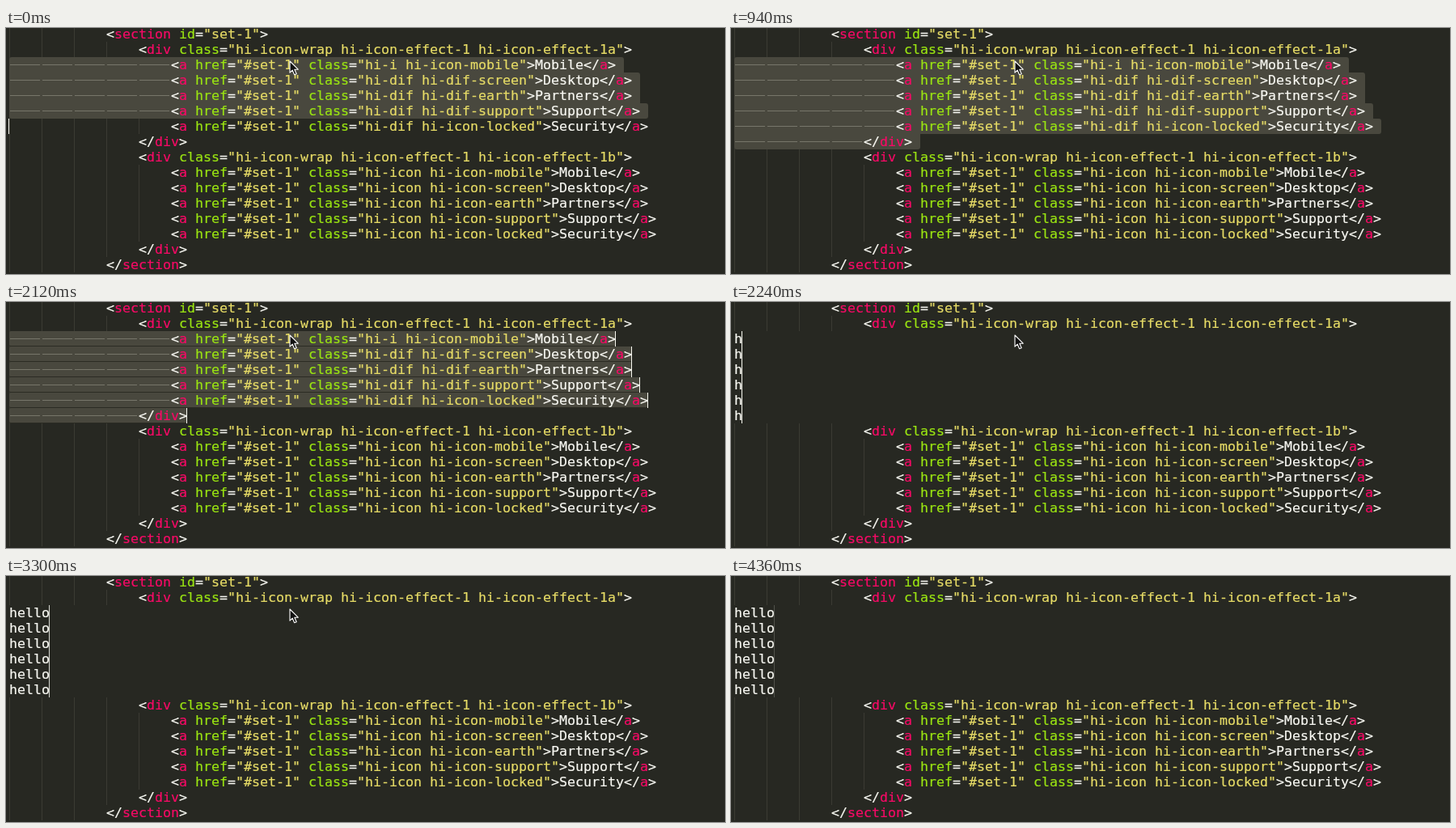
Recreate the animation shown at these times as an HTML page. Size 889x304 px, loop 4460 ms.

```html
<!DOCTYPE html>
<html lang="en">
<head>
<meta charset="utf-8">
<title>Multiple cursors</title>
<style>
  html, body { margin: 0; width: 100%; height: 100%; overflow: hidden; background: #272822; }
  #stage {
    position: relative; width: 889px; height: 304px; overflow: hidden;
    font: 16.61px/19px "DejaVu Sans Mono", Menlo, monospace;
    color: #f8f8f2; white-space: pre; -webkit-text-stroke: .2px;
  }
  #stage div, #mouse { position: absolute; }
  .row { left: 0; width: 889px; height: 19px; }
  .code { top: 0; }
  .guides {
    left: 4px; height: 19px;
    background: repeating-linear-gradient(90deg, #3b3b33 0 1px, transparent 1px 40px);
  }
  .sel { left: 4px; height: 19px; background: #49483e; box-sizing: border-box; }
  .split .sel { border: 1px solid #2b2b23; border-width: 0 0 1px; border-radius: 2px; }
  .tabs {
    left: 4px; top: 9px; height: 1px;
    background: repeating-linear-gradient(90deg, transparent 0 1px, #77766a 1px 38px, transparent 38px 40px);
  }
  .caret { width: 1px; height: 19px; background: #f8f8f0; }
  .tag { color: #f60a66; }
  .attr { color: #9ae412; }
  .str { color: #e6db66; }
  #mouse { left: 0; top: 0; }
</style>
</head>
<body>
<div id="stage">
  <svg id="mouse" width="14" height="20" viewBox="-1 -1 14 20">
    <path d="M0 0V14.2L3.2 11.2L5.6 16.8L8.2 15.7L5.8 10.2H10.2Z" fill="#111" stroke="#fff" stroke-width="1.1" stroke-linejoin="round"/>
  </svg>
</div>
<script>
const LOOP = 4460, LINE = 19, CHAR = 10, LEFT = 4, FIRST = 2, COUNT = 6;
const stage = document.getElementById('stage');
const mouse = document.getElementById('mouse');

const link = (cls, label) => [5, `<a href="#set-1" class="${cls}">${label}</a>`];
const wrap = end => [4, `<div class="hi-icon-wrap hi-icon-effect-1 hi-icon-effect-1${end}">`];
const lines = [
  [3, '<section id="set-1">'],
  wrap('a'),
  link('hi-i hi-icon-mobile', 'Mobile'),
  link('hi-dif hi-dif-screen', 'Desktop'),
  link('hi-dif hi-dif-earth', 'Partners'),
  link('hi-dif hi-dif-support', 'Support'),
  link('hi-dif hi-icon-locked', 'Security'),
  [4, '</div>'],
  wrap('b'),
  link('hi-icon hi-icon-mobile', 'Mobile'),
  link('hi-icon hi-icon-screen', 'Desktop'),
  link('hi-icon hi-icon-earth', 'Partners'),
  link('hi-icon hi-icon-support', 'Support'),
  link('hi-icon hi-icon-locked', 'Security'),
  [4, '</div>'],
  [3, '</section>']
];

// start time, mode, selected rows or typed letters, caret opacity
const beats = [
  [0, 'block', 4, 1], [240, 'block', 5, 1], [360, 'block', 6, 1],
  [710, 'block', 6, .7], [820, 'block', 6, .3], [940, 'block', 6, 0],
  [1060, 'split', 6, 1], [1300, 'split', 6, .85], [1420, 'split', 6, .5],
  [1530, 'split', 6, .2], [1650, 'split', 6, 0], [2010, 'split', 6, .5], [2120, 'split', 6, 1],
  [2240, 'type', 1, 1], [2360, 'type', 2, 1], [2600, 'type', 3, 1],
  [2840, 'type', 4, 1], [2950, 'type', 5, 1],
  [3300, 'type', 5, .85], [3420, 'type', 5, .5], [3540, 'type', 5, .2], [3660, 'type', 5, 0],
  [3780, 'type', 5, .3], [3890, 'type', 5, .7], [4010, 'type', 5, 1], [4360, 'type', 5, .2]
];

const paint = text => text.replace(
  /(<\/?)(\w+)|([\w-]+)(?==")|("[^"]*")|>/g,
  (all, open, tag, attr, str) =>
    tag ? `${open.replace('<', '&lt;')}<span class="tag">${tag}</span>` :
    attr ? `<span class="attr">${attr}</span>` :
    str ? `<span class="str">${str}</span>` : '&gt;');

function add(parent, cls) {
  const el = document.createElement('div');
  el.className = cls;
  parent.insertBefore(el, parent === stage ? mouse : null);
  return el;
}

const rows = lines.map(([indent, text], i) => {
  const row = add(stage, 'row');
  row.style.top = i * LINE - 2 + 'px';
  const part = {
    row, html: paint(text), indent,
    end: LEFT + indent * 40 + text.length * CHAR,
    guides: add(row, 'guides'), sel: add(row, 'sel'),
    tabs: add(row, 'tabs'), code: add(row, 'code'), caret: add(row, 'caret')
  };
  part.guides.style.width = part.tabs.style.width = indent * 40 + 'px';
  return part;
});

const show = (el, on) => { el.style.display = on ? '' : 'none'; };

function draw([, mode, amount, glow]) {
  stage.className = mode;
  rows.forEach((r, i) => {
    const n = i - FIRST;
    const active = n >= 0 && n < COUNT;
    const typed = active && mode === 'type';
    const picked = active && mode !== 'type' && n < amount;
    const html = typed ? 'hello'.slice(0, amount) : r.html;
    if (r.code.innerHTML !== html) r.code.innerHTML = html;
    r.code.style.left = LEFT + (typed ? 0 : r.indent * 40) + 'px';
    show(r.guides, !typed);
    show(r.sel, picked);
    show(r.tabs, picked);
    r.sel.style.width = r.end - LEFT + (mode === 'block' ? CHAR : 0) + 'px';
    if (picked && mode === 'block') {
      const above = n ? rows[i - 1].end : 0;
      const below = n < amount - 1 ? rows[i + 1].end : 0;
      const round = on => on ? '3px ' : '0 ';
      r.sel.style.borderRadius = round(!n) + round(r.end > above) + round(r.end > below) + round(!below);
    } else {
      r.sel.style.borderRadius = '';
    }
    show(r.caret, mode === 'block' ? n === amount : active);
    r.caret.style.opacity = glow;
    r.caret.style.left = (mode === 'block' ? LEFT : typed ? LEFT + amount * CHAR : r.end) - 1 + 'px';
  });
}

// The pointer leaves through the lower right.
function moveMouse(time) {
  const p = Math.min(1, Math.max(0, (time - 3300) / 480));
  const ease = p * p * (3 - 2 * p);
  mouse.style.transform = `translate(${Math.round(350 + 433 * ease)}px, ${Math.round(40 + 251 * ease)}px)`;
  show(mouse, time < 3890);
}

let current;
const start = performance.now();
function tick() {
  const t = (performance.now() - start) % LOOP;
  const beat = beats.findLast(b => b[0] <= t) || beats[0];
  if (beat !== current) {
    current = beat;
    draw(beat);
    moveMouse(beat[0]);
  }
  requestAnimationFrame(tick);
}
tick();
</script>
</body>
</html>
```
